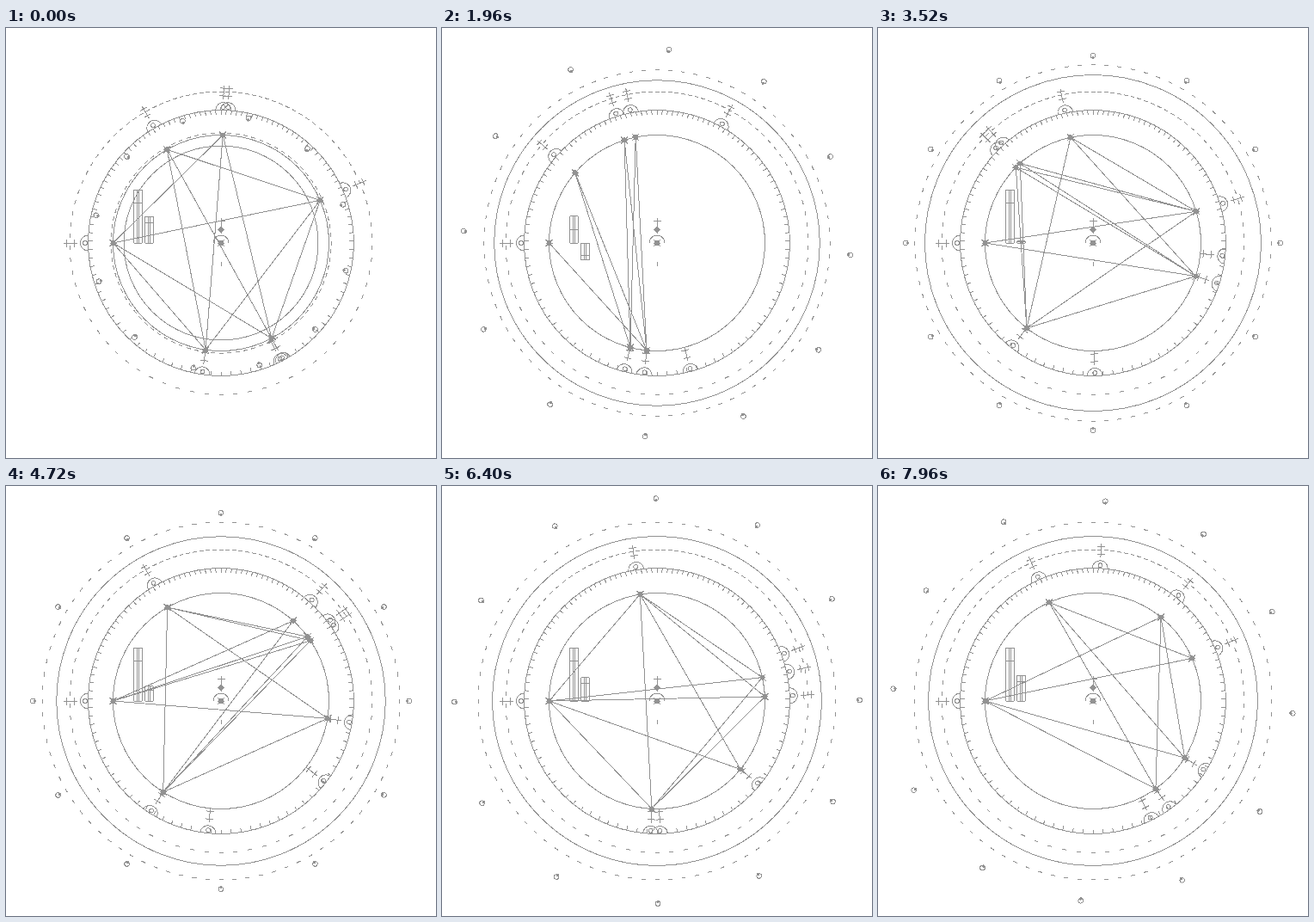
Animation of 500x500 px, one loop 8 s. Source, as an HTML page:

```html
<!DOCTYPE html>
<html>
<head>
<meta charset="utf-8">
<style>
html, body { margin: 0; width: 100%; height: 100%; overflow: hidden; background: #fff; }
svg { display: block; width: 500px; height: 500px; }
path { shape-rendering: crispEdges; }
</style>
</head>
<body>
<svg viewBox="0 0 500 500">
  <path id="lines" fill="none" stroke="#929292"/>
  <path id="dots" fill="#929292"/>
</svg>
<script>
const LOOP = 8000, STEP = 40, C = 250, INNER = 125.5, RING = 154.5;
const { PI, sin, cos, exp } = Math;

// Key angles of the six wandering nodes, in degrees clockwise from the top.
const KEY_TIMES = [0, 760, 1960, 3520, 4720, 6400, 7960];
const NODES = [
  [-30, -70, -49.4, -45.6, -29.8, -9, -24],
  [-30, -36, -17.6, -42.5, 42, 77.4, 39],
  [1, -25, -11.4, -12, 53.4, 77.4, 39],
  [66.7, 14.2, -11.4, 73, 56, 87.7, 66.7],
  [152, 173, 185.5, 107.9, 99.3, 129.3, 121.8],
  [188.2, 194.3, 194.3, 217.9, 212.4, 182.8, 144.5]
];
// The two unlinked handles swing out once per loop and return.
const LOOSE = [
  u => 3 + 125 * sin(PI * u ** 1.35) ** 2,
  u => 153 + 33 * sin(PI * u ** 1.5)
];

let lines, dots;

const clamp = x => Math.max(0, Math.min(1, x));
const smooth = x => (x = clamp(x), x * x * (3 - 2 * x));

function nodeAngle(keys, t) {
  let i = 1;
  while (t > KEY_TIMES[i]) i++;
  const from = KEY_TIMES[i - 1], u = (t - from) / (KEY_TIMES[i] - from);
  return keys[i - 1] + (keys[i] - keys[i - 1]) * u;
}

// Point at radius r and angle a, shifted sideways by s.
function polar(r, a, s = 0) {
  const k = a * PI / 180, x = sin(k), y = -cos(k);
  return [C + r * x - s * y, C + r * y + s * x];
}
const ringPath = (x, y, r) =>
  `M${x - r} ${y}a${r} ${r} 0 1 0 ${2 * r} 0a${r} ${r} 0 1 0 ${-2 * r} 0`;
const line = (p, q) => { lines += `M${p}L${q}`; };
const circle = (x, y, r) => { lines += ringPath(x, y, r); };
const dot = (x, y, r) => { dots += ringPath(x, y, r); };

function star(x, y) {
  dot(x, y, 3);
  line([x - 4, y - 4], [x + 4, y + 4]);
  line([x - 4, y + 4], [x + 4, y - 4]);
  line([x - 4, y], [x + 4, y]);
}

// Evenly numbered angles, packed tighter at the top by k.
function spread(count, k, place) {
  for (let i = 0; i < count; i++) {
    const a = i / count * 2 * PI;
    place((a - k * sin(a)) * 180 / PI);
  }
}
const dashedRing = (r, count, k, size) =>
  spread(count, k, a => line(polar(r, a, -size / 2), polar(r, a, size / 2)));

// Handles below the horizon fold inside the ring.
function handle(a) {
  const up = cos(a * PI / 180) > -1e-6;
  const r = d => up ? RING + d : RING - d;
  lines += `M${polar(RING, a, -9)}A9 9 0 0 ${+up} ${polar(RING, a, 9)}`;
  circle(...polar(r(3.5), a), 2.4);
  line(polar(r(12.5), a), polar(r(29), a));
  for (const d of [16.5, 25.5]) line(polar(r(d), a, -4.5), polar(r(d), a, 4.5));
}

function bar(x, height, cap) {
  const top = C - height;
  for (const dx of [0, 3.5, 6, 9.5]) line([x + dx, C], [x + dx, top]);
  for (const y of [C, top, top + cap]) line([x, y], [x + 9.5, y]);
}

// Every two seconds the beads jump out, turn by one place and ease back.
function beads(t, radius) {
  const p = (t + 200) % 2000 - 200;
  const out = 1 - (1 - clamp((p + 120) / 220)) ** 3;
  const push = out - smooth((p - 320) / 400);
  const turn = 30 * (1 - exp(-0.0104 * Math.max(0, p + 52)));
  const r = radius + 18.5 * push;
  for (let i = 0; i < 12; i++) {
    const a = turn + i * 30;
    circle(...polar(r, a), 2.8);
    dot(...polar(r - 2.3, a), 1.7);
  }
}

function hub() {
  star(C, C);
  lines += `M${C - 9} ${C}a9 9 0 0 1 18 0`;
  line([C, 221], [C, 239]);
  line([C - 4.5, 224.5], [C + 4.5, 224.5]);
  dots += `M${C} 230.5l4 4l-4 4l-4 -4z`;
  line([C, 272], [C, 277]);
}

function draw(t) {
  const u = t / LOOP, grow = 1 - exp(-t / 800);
  lines = dots = '';

  circle(C, C, INNER);
  circle(C, C, RING);
  circle(C, C, 113 + 83.5 * grow - 5 * smooth((t - 3520) / 1200));
  spread(108, 0.32, a => line(polar(RING, a), polar(RING - 5, a)));
  dashedRing(176, 90, 0.38, 5);
  dashedRing(128 + 80 * grow, 84, 0, 5);
  beads(t, 132 + 87 * grow);
  hub();

  const x = t / 1800, dip = (x * exp(1 - x)) ** 2;
  const heightB = 31 - 51 * dip;
  bar(148.5, 62 - 33 * sin(PI * clamp(t / 3500)) ** 4, 15.5);
  bar(161.5, heightB, heightB / 4);

  const angles = [-90, ...NODES.map(keys => nodeAngle(keys, t))];
  angles.forEach((a, i) => {
    star(...polar(INNER, a));
    handle(a);
    for (const b of angles.slice(i + 1)) {
      const gap = Math.abs((a - b + 540) % 360 - 180);
      if (gap > 80) line(polar(INNER, a), polar(INNER, b));
    }
  });
  LOOSE.forEach(swing => handle(swing(u)));

  document.getElementById('lines').setAttribute('d', lines);
  document.getElementById('dots').setAttribute('d', dots);
}

const start = performance.now();
function tick() {
  const t = (performance.now() - start) % LOOP;
  draw(Math.floor(t / STEP) * STEP);
  requestAnimationFrame(tick);
}
tick();
</script>
</body>
</html>
```
